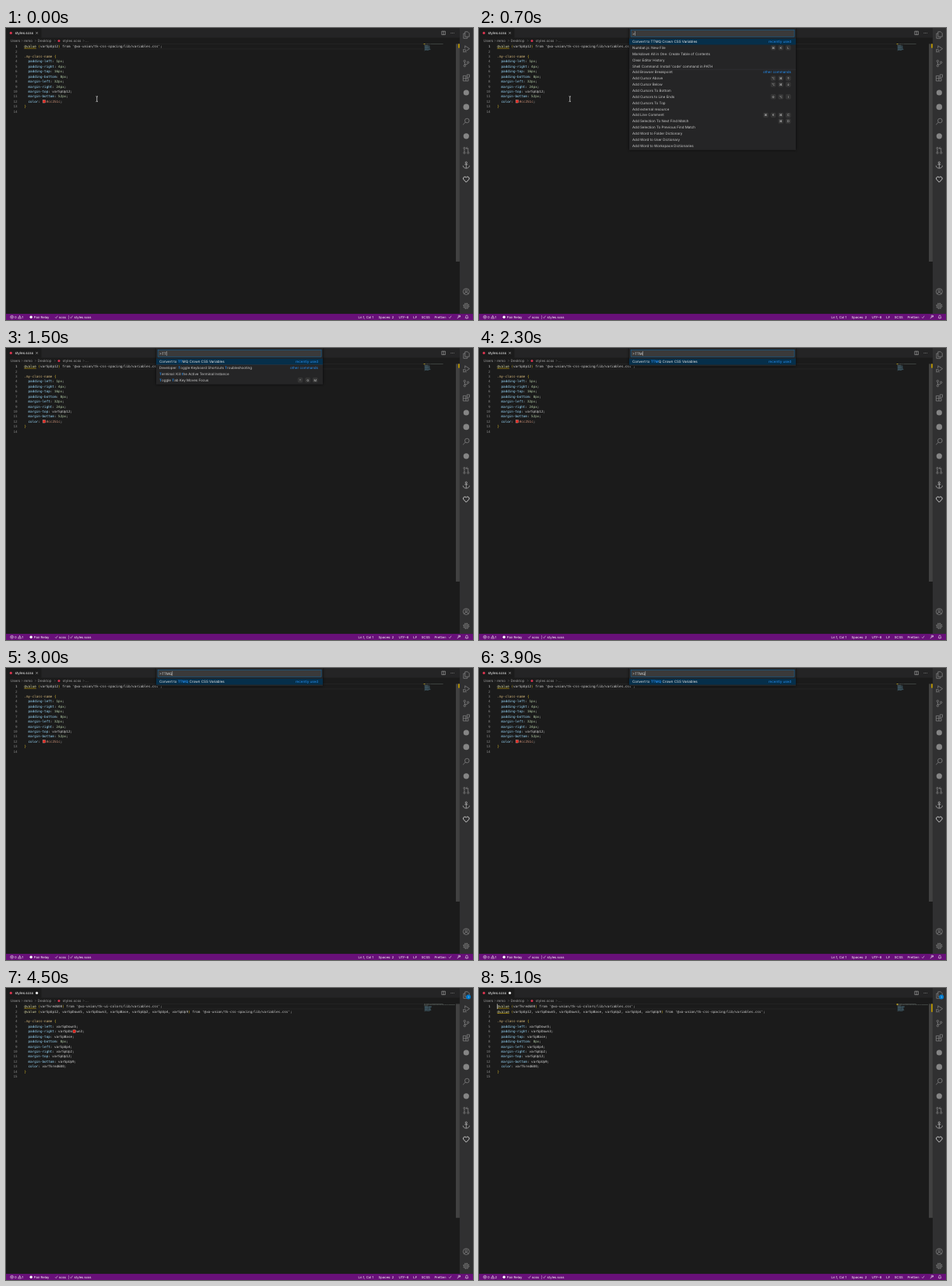
An HTML page that plays this animation: 600 by 375 pixels, repeating every 5.5 s.

```html
<!DOCTYPE html>
<html lang="en">
<head>
<meta charset="utf-8">
<title>Editor command palette</title>
<style>
  html, body { margin: 0; width: 100%; height: 100%; overflow: hidden; background: #1b1b1b; }
  svg { display: block; width: 600px; height: 375px; }
  text { white-space: pre; text-rendering: geometricPrecision; font-family: Inter, "DejaVu Sans", sans-serif; }
  .code { font-family: "DejaVu Sans Mono", monospace; }
  .line { fill: none; stroke: #858585; stroke-width: .75; }
  .panel { filter: drop-shadow(0 .3px 1.4px #000c); }
</style>
</head>
<body>
<svg viewBox="0 0 600 375"><g id="base"></g><g id="live"></g></svg>
<script>
const LOOP = 5500, UI = 4.53, BAR = 4.2, MONO = 4.285;
const TOP = 20.4, ROW = 6.43, LEFT = 23.4, CHAR = 2.58, PICK = 7.86;
const GOLD = '#e8c52a', BLUE = '#2490f5', RED = '#d8344f', GREY = '#858585';

const rect = (x, y, w, h, fill, more = '') =>
  `<rect x="${x}" y="${y}" width="${w}" height="${h}" fill="${fill}" ${more}/>`;
const disc = (x, y, r, fill) => `<circle cx="${x}" cy="${y}" r="${r}" fill="${fill}"/>`;
const ring = (x, y, r, more = '') => `<circle cx="${x}" cy="${y}" r="${r}" ${more}/>`;
const path = (d, more = '') => `<path d="${d}" ${more}/>`;
// Text is placed by the middle of its line.
const text = (x, y, s, fill, size = UI, more = '') =>
  `<text x="${x}" y="${y + size * .36}" font-size="${size}" fill="${fill}" ${more}>${s}</text>`;
const span = (s, fill, more = '') => `<tspan fill="${fill}" ${more}>${s}</tspan>`;

const pen = document.createElement('canvas').getContext('2d');
pen.font = '100px Inter, "DejaVu Sans", sans-serif';
const widthOf = s => pen.measureText(s).width * UI / 100;

const spacing = "from '@xo-union/tk-css-spacing/lib/variables.css';";
// "~" marks the place of the colour swatch.
const before = `@value (varSpUp12) ${spacing}

.my-class-name {
  padding-left: 1px;
  padding-right: 4px;
  padding-top: 16px;
  padding-bottom: 8px;
  margin-left: 32px;
  margin-right: 24px;
  margin-top: varSpUp12;
  margin-bottom: 52px;
  color: ~#cc251c;
}
`.split('\n');
const after = `@value (varTkred600) from '@xo-union/tk-ui-colors/lib/variables.css';
@value (varSpUp12, varSpDown5, varSpDown3, varSpBase, varSpUp2, varSpUp4, varSpUp9) ${spacing}

.my-class-name {
  padding-left: varSpDown5;
  padding-right: varSpDo~wn3;
  padding-top: varSpBase;
  padding-bottom: 8px;
  margin-left: varSpUp4;
  margin-right: varSpUp2;
  margin-top: varSpUp12;
  margin-bottom: varSpUp9;
  color: varTkred600;
}
`.split('\n');

const allCommands = [
  ['Convert to TTMQ Crown CSS Variables', 'recently used'],
  ['Numbat.js: New File', '⌘ K L'],
  ['Markdown All in One: Create Table of Contents'],
  ['Clear Editor History'],
  ["Shell Command: Install 'code' command in PATH"],
  ['Add Browser Breakpoint', 'other commands'],
  ['Add Cursor Above', '⌥ ⌘ ↑'],
  ['Add Cursor Below', '⌥ ⌘ ↓'],
  ['Add Cursors To Bottom'],
  ['Add Cursors to Line Ends', '⇧ ⌥ I'],
  ['Add Cursors To Top'],
  ['Add external resource'],
  ['Add Line Comment', '⌘ K ⌘ C'],
  ['Add Selection To Next Find Match', '⌘ D'],
  ['Add Selection To Previous Find Match'],
  ['Add Word to Folder Dictionary'],
  ['Add Word to User Dictionary'],
  ['Add Word to Workspace Dictionaries']
];
const matches = [
  ['Developer: [T]oggle Keyboard Shortcuts [T]roubleshooting', 'other commands'],
  ['[T]erminal: Kill [t]he Active Terminal Instance'],
  ['[T]oggle [T]ab Key Moves Focus', '⌃ ⇧ M']
];

function paint(s) {
  const tint = m => span(m, m === '@value' ? '#dcdcaa' : /[(){}]/.test(m) ? GOLD :
    m[0] === '.' ? '#d7ba7d' : m[0] === '#' ? '#ce9178' : /^\d/.test(m) ? '#b5cea8' : '#9cdcfe');
  return s.replace(/@value|[(){}]|\.my-class-name|[\w-]+(?=:)|\b\d+px|#\w+/g, tint);
}

function editor(lines, swatch, warnings) {
  let out = '';
  lines.forEach((raw, i) => {
    const y = TOP + (i + .5) * ROW;
    const write = (col, s, shift = 0) =>
      text(LEFT + col * CHAR + shift, y, paint(s), '#d4d4d4', MONO, 'class="code"');
    const cut = swatch ? raw.indexOf('~') : -1, s = raw.replace('~', '');
    out += text(14.6, y, i + 1, i ? GREY : '#c6c6c6', MONO, 'class="code" text-anchor="end"');
    if (cut < 0) out += write(0, s);
    else {
      out += write(0, s.slice(0, cut)) + write(cut, s.slice(cut), 5.1) +
        rect(LEFT + cut * CHAR + .6, y - 1.9, 3.6, 3.6, '#e3221a', 'stroke="#ddd" stroke-width=".3"');
    }
    for (const m of s.slice(0, 112).matchAll(/\S+/g))
      out += rect(537 + m.index * .357, 20.5 + i * .714, m[0].length * .357, .45,
        s[0] === ' ' ? '#6fa8c4' : '#9aa8a0', 'opacity=".6"');
  });
  for (let i = 0; i < warnings; i++) {
    const y = TOP + (i + 1) * ROW - .7;
    out += path(`M${LEFT} ${y}h${6 * CHAR}`, 'stroke="#cca700" stroke-width=".6"');
  }
  return out;
}

function keys(y, list) {
  return list.split(' ').reverse().map((k, i) => {
    const x = 397.3 - i * 9.6;
    return rect(x - 3, y - 2.9, 6, 5.8, '#343434', 'rx="1" stroke="#444" stroke-width=".3"') +
      text(x, y, k, '#ccc', 3.9, 'text-anchor="middle"');
  }).join('');
}

function palette(t) {
  const query = t < 1200 ? '>' : t < 1400 ? '>T' : t < 2300 ? '>TT' : t < 2900 ? '>TTM' : '>TTMQ';
  const hits = t < 1500 ? 0 : t < 2300 ? 2 : t < 3000 ? 3 : 4;
  let rows = allCommands;
  if (hits) {
    const name = 'TTMQ';
    rows = [[`Convert to [${name.slice(0, hits)}]${name.slice(hits)} Crown CSS Variables`, 'recently used']];
    if (hits === 2) rows = rows.concat(matches);
  }
  let out = rect(192.9, 0, 214.2, 15.3 + rows.length * PICK, '#252526', 'class="panel"') +
    rect(195.1, 2.5, 210, 8.7, '#3a3a3a', 'stroke="#0e70b4" stroke-width=".5"') +
    text(197, 7, query, '#ddd') +
    rect(192.9, 13.6, 214.2, PICK, '#062f4a');
  rows.forEach(([label, side], i) => {
    const y = 13.6 + (i + .5) * PICK;
    out += text(197, y, label.replace(/\[(.+?)\]/g, (_, m) => span(m, BLUE, 'font-weight="600"')), i ? '#ccc' : '#eee');
    if (!side) return;
    if (!/ (used|commands)$/.test(side)) { out += keys(y, side); return; }
    out += text(401, y, side, BLUE, UI, 'text-anchor="end"');
    if (i) out += rect(192.9, y - PICK / 2, 214.2, .35, '#3f3f46');
  });
  if (t < 1900 || t >= 2300 && t < 3400 || t >= 3900)
    out += rect(197.2 + widthOf(query), 4.2, .45, 5.6, '#ddd');
  return out;
}

function scene(t) {
  const done = t >= 4100, checked = t >= 4600;
  const open = t >= 700 && t < 4000;
  const warnings = checked ? 2 : 1;
  let out = rect(578, TOP, 4.9, done ? 274.8 : 279.6, '#414141');
  if (!done || checked)
    out += rect(581, TOP, 1.8, 5.2 * warnings, '#b89500') + rect(536.5, 20.2, 2, .8 * warnings, '#cca700');
  out += editor(done ? after : before, t < 5000, warnings);
  if (t >= 400 && t < 700 || t >= 4000 && t < 4500 || t >= 5000)
    out += rect(LEFT - .2, TOP, .7, ROW, '#c8c8c8');
  out += done ? disc(39.6, 6.4, 1.6, '#e8e8e8')
    : path('M38.4 5.2l2.5 2.5m0-2.5l-2.5 2.5', 'stroke="#ddd" stroke-width=".5"');
  if (done) out += disc(594.1, 11.5, 3, '#007acc') + text(594.1, 11.5, 1, '#fff', 3.3, 'text-anchor="middle"');
  if (t < 1200)
    out += path('M115.6 87.7q1.2 0 1.2.8v5.2q0 .8-1.2.8m2.4-6.8q-1.2 0-1.2.8m0 5.2q0 .8 1.2.8', 'class="line" style="stroke:#ddd"');
  out += text(20.6, 371.2, warnings, '#fff', BAR);
  return out + (open ? palette(t) : '');
}

function chrome() {
  const icon = (y, body, more = '') => `<g class="line" transform="translate(591.3 ${y})" ${more}>${body}</g>`;
  const bright = 'style="stroke:#b4b4b4"';
  const thin = 'class="line" style="stroke:#fff;stroke-width:.5"';
  const tick = x => path(`M${x} 371.4l1.1 1.2 2-2.9`, thin);
  let out = rect(0, 0, 600, 375, '#1b1b1b') + rect(0, 0, 583, 12.5, '#242425') +
    rect(0, 0, 45.5, 12.5, '#1b1b1b') + rect(582.9, 0, 17.1, 367.2, '#303031') +
    rect(0, 367.1, 600, 7.9, '#681079');

  out += disc(6.3, 6.4, 1.6, RED) + text(11.4, 6.4, 'styles.scss', '#fff');
  out += path('M559.8 4.2h4.6v4.4h-4.6zM562.1 4.2v4.4', 'class="line" style="stroke:#c5c5c5;stroke-width:.5"');
  for (const x of [571.9, 573.6, 575.3]) out += disc(x, 6.4, .45, '#c5c5c5');

  for (const [x, s] of [[5.8, 'Users'], [23, 'remo'], [40.8, 'Desktop'], [72.8, 'styles.scss'], [102, '...']])
    out += text(x, 16.4, s, '#a2a2a2');
  for (const x of [20, 37.3, 62, 99])
    out += path(`M${x} 15.2l1.2 1.2-1.2 1.2`, 'class="line" style="stroke-width:.45"');
  out += disc(68, 16.4, 1.5, RED);

  out += path(`M22.6 ${TOP}H536M22.6 ${TOP + ROW}H536`, 'stroke="#2b2b2b" stroke-width=".6"');

  out += icon(9, path('M-1.5-4.2h3.4l2 2v4.4h-5.4zM-1.5-2h-2v6.3h5V2.4')) +
    icon(27, path('M-1.6-.8V-4.2L4.2-.4.4 2.2M-4.3.4l1 .7m-1 3l1-.6M.3 4.1l-1-.6') + ring(-2, 2.2, 1.6)) +
    icon(45.5, ring(-2, -3, 1.2) + ring(-2, 3, 1.2) + ring(2.3, -1.3, 1.2) + path('M-2-1.8v3.6M2.3-.1Q2.3 1.4-2 1.5')) +
    icon(64, path('M-4-2.6h3.6v6.6H-4zM-4 .7h6.7V4h-3.1M.9-4.1h3.3v3.3H.9z')) +
    disc(591.3, 83, 3.6, GREY) + disc(591.3, 101.4, 3.8, GREY) +
    icon(120, ring(1, -1, 2.8) + path('M-1 1-4.2 4.2')) +
    disc(591.3, 138.8, 3.6, GREY) +
    icon(157.3, ring(-2.4, -3, 1.1) + ring(-2.4, 3, 1.1) + ring(2.4, 3, 1.1) +
      path('M-2.4-1.9v3.8M2.4 1.9V-2.9H-.3M1.2-4.3-.3-2.9l1.5 1.4')) +
    icon(176, ring(0, -3.2, 1.1) + path('M0-2.1V4.2M-2-.8h4M-4.1.7c0 2.3 2 3.4 4.1 3.4s4.1-1.1 4.1-3.4'), bright) +
    icon(194.5, path('M0 3.6-3.4 0a2 2 0 0 1 3.4-2.6A2 2 0 0 1 3.4 0z'), 'style="stroke:#c8c8c8;stroke-width:1"') +
    icon(338.5, ring(0, 0, 4) + ring(0, -1, 1.4) + path('M-2.6 3Q-2 .9 0 .9t2.6 2.1')) +
    icon(357, ring(0, 0, 1.2) + ring(0, 0, 2.8) + ring(0, 0, 3.7, 'stroke-dasharray="1.45 1.45"'));

  out += ring(7.6, 371.2, 1.9, thin) + path('M6.8 370.4l1.6 1.6m0-1.6l-1.6 1.6', thin) +
    path('M17.6 369.3l2 3.6h-4zM17.6 370.6v1.1', thin) + disc(32.2, 371.2, 1.7, '#fff') +
    tick(63.2) + tick(82.4) + tick(569) +
    ring(582, 370, 1, thin) + path('M580 373.2q0-1.8 2-1.8m-3-2.2h-.1m4.6-.2v2h-1', thin) +
    path('M590 372.3q.7-.6.7-1.8 0-1.5 1.3-1.5t1.3 1.5q0 1.2.7 1.8zM591.4 373.1h1.2', thin);
  for (const [x, s] of [[11, '0'], [35.8, 'Pair Relay'], [68, 'scss'], [79.4, '|'], [87.6, 'styles.scss'],
    [452.6, 'Ln 1, Col 1'], [478.6, 'Spaces: 2'], [504.5, 'UTF-8'], [523.3, 'LF'], [533.7, 'SCSS'], [550.6, 'Prettier:']])
    out += text(x, 371.2, s, '#fff', BAR);
  return out;
}

const live = document.getElementById('live');
let shown = '';
function tick() {
  const markup = scene(performance.now() % LOOP);
  if (markup !== shown) live.innerHTML = shown = markup;
  requestAnimationFrame(tick);
}
document.getElementById('base').innerHTML = chrome();
tick();
</script>
</body>
</html>
```
